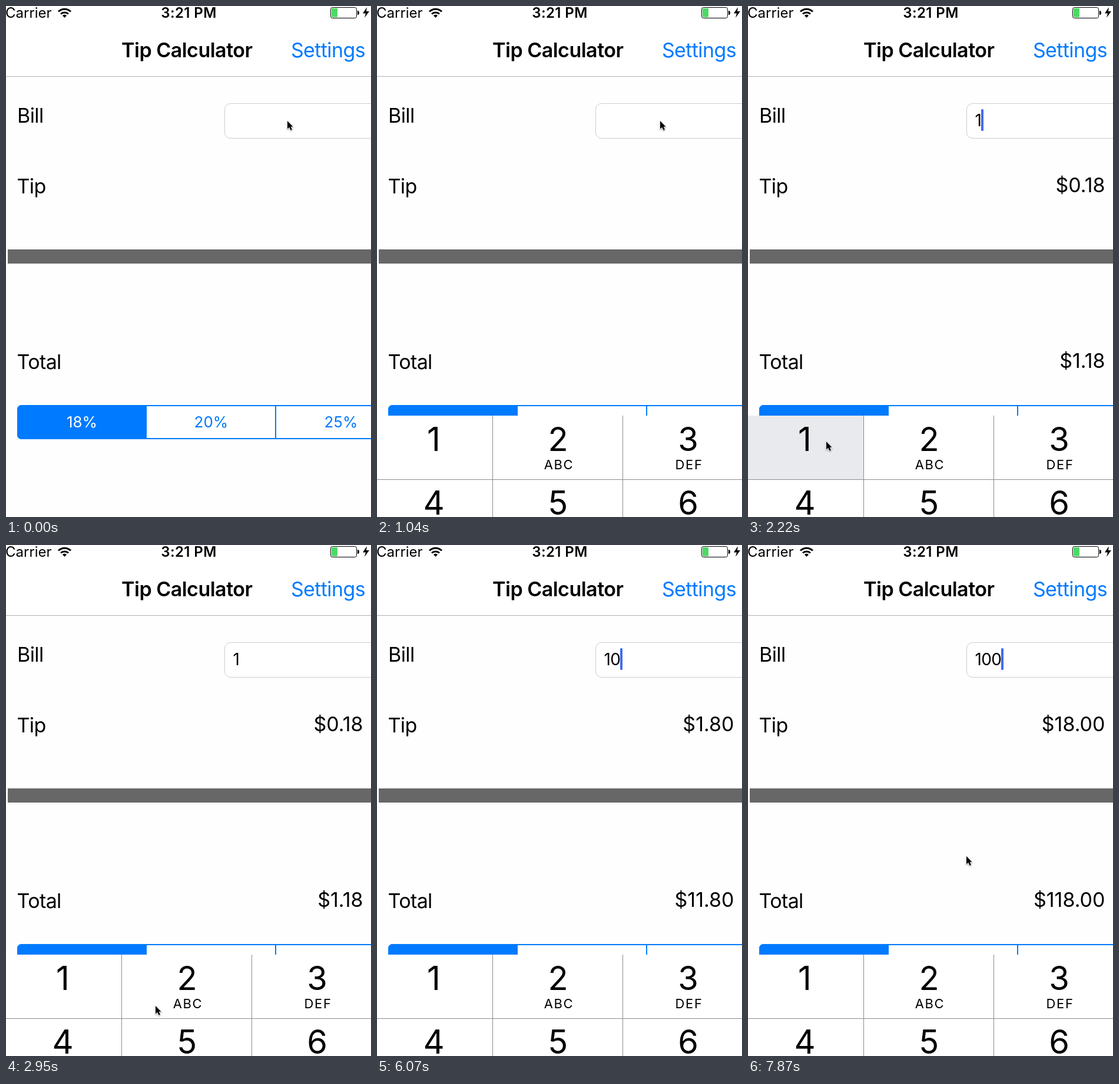
These frames come from a looping animation (620x867 px, 8000 ms). An HTML page:

```html
<!DOCTYPE html>
<html lang="en">
<head>
<meta charset="utf-8">
<title>Tip Calculator</title>
<style>
html, body { margin: 0; width: 100%; height: 100%; overflow: hidden; background: #fefefe; }
svg { display: block; width: 620px; height: 867px; font: 34px Inter, "Liberation Sans", sans-serif; letter-spacing: -.018em; }
.mid { text-anchor: middle; }
.end { text-anchor: end; }
.bold { font-weight: 600; }
.blue { fill: #007aff; }
.money { text-anchor: end; letter-spacing: 0; }
.small { font-size: 24px; letter-spacing: 0; }
.seg { font-size: 26px; letter-spacing: 0; }
.digit { font-size: 56px; letter-spacing: 0; }
.abc { font-size: 22px; letter-spacing: 1.7px; }
</style>
</head>
<body>
<svg viewBox="0 0 620 867">
  <rect width="620" height="119" fill="#fff"/>
  <text class="small" x="-1" y="20">Carrier</text>
  <g fill="none" stroke="#000" stroke-width="3">
    <path d="M89 9.5a15 15 0 0 1 21 0M93 13.5a9.5 9.5 0 0 1 13 0"/>
    <path d="M96 16.2a5.4 5.4 0 0 1 7 0L99.5 20Z" fill="#000" stroke="none"/>
  </g>
  <text class="small bold mid" x="310.5" y="20" style="letter-spacing:.4px">3:21 PM</text>
  <rect x="551.5" y="2.5" width="44" height="18" rx="3" fill="#fff" stroke="#000"/>
  <rect x="553" y="4" width="10" height="15" rx="1" fill="#4cd964"/>
  <path d="M597 8q3 0 3 3.5t-3 3.5Z"/>
  <path d="M613 2L606 12.5H611L609 20L617 9H612Z"/>
  <text class="bold mid" x="307.3" y="87" style="letter-spacing:-.015em">Tip Calculator</text>
  <text class="blue end" x="610" y="87">Settings</text>
  <path d="M0 119.5H620" stroke="#b2b2b2"/>

  <text x="19" y="198">Bill</text>
  <text x="18.500" y="318">Tip</text>
  <text x="18.500" y="616">Total</text>
  <rect x="371.5" y="165.5" width="280" height="59" rx="10" fill="#fff" stroke="#ccc"/>
  <text id="bill" x="385.5" y="204" style="font-size:28px"></text>
  <rect id="caret" y="175" width="4" height="37" rx="1.5" fill="#426bf2"/>
  <text id="tip" class="money" x="606.5" y="316"></text>
  <text id="total" class="money" x="606.5" y="614"></text>
  <rect x="3" y="413" width="617" height="24" fill="#676767"/>

  <rect x="20" y="678" width="658" height="56" rx="7" fill="#fff" stroke="#007aff" stroke-width="2"/>
  <path class="blue" d="M239 677H27q-8 0-8 8V727q0 8 8 8H239Z"/>
  <path d="M458 678V734" stroke="#007aff" stroke-width="2"/>
  <text class="seg mid" x="129" y="715" fill="#fff">18%</text>
  <text class="seg mid blue" x="348.5" y="715">20%</text>
  <text class="seg mid blue" x="569" y="715">25%</text>

  <g id="pad">
    <rect width="620" height="440" fill="#fff"/>
    <rect id="press" width="196" height="108" fill="#d2d5db"/>
    <path d="M196.5 0V440M417.5 0V440M0 108.5H620" fill="none" stroke="#8c8c8c"/>
  </g>
  <path id="mouse" d="M0 0V13.5L3.2 10.7L5.6 15.8L8 14.7L5.7 9.8H9.5Z" stroke="#fff" stroke-width="1.5" paint-order="stroke"
    style="filter:drop-shadow(0 1px 1px #0006)"/>
</svg>
<script>
const $ = id => document.getElementById(id);
const clamp = v => Math.min(1, Math.max(0, v));
const money = v => '$' + v.toFixed(2);
const TICK = 148;

['', 'ABC', 'DEF', '', '', ''].forEach((letters, i) => {
  const x = 96.5 + i % 3 * 216 - (i % 3 ? 5 : 0) + (i % 3 == 2 ? 5 : 0), y = i < 3 ? 60 : 168;
  $('pad').insertAdjacentHTML('beforeend',
    `<text class="digit mid" x="${x}" y="${y}">${i + 1}</text>
     <text class="abc mid" x="${x + 1.5}" y="91">${letters}</text>`);
});

// The caret stays lit after each restart, then blinks softly.
const typed = [2200, 6050, 6650];
const restarts = [290, 1920, ...typed];
function caret(t) {
  const start = restarts.findLast(s => s <= t);
  if (!start) return 0;
  const age = t - start;
  return age < 500 ? 1 : clamp(.85 + 1.2 * Math.cos((age - 318) / 985 * 2 * Math.PI));
}

// Pointer moves: start ms, end ms, destination; off stage between the last two.
const moves = [
  [0, 300, 481, 195], [1340, 1925, 133, 739], [2360, 2950, 254, 782],
  [5030, 5170, 254, 900], [6000, 6100, 338, 900], [7270, 7840, 371, 528]
];
function pointer(t) {
  let x = 478, y = 195;
  for (const [from, to, endX, endY] of moves) {
    const e = Math.sin(clamp((t - from) / (to - from)) * Math.PI / 2);
    x += (endX - x) * e;
    y += (endY - y) * e;
  }
  return `translate(${x} ${y})`;
}

function draw(now) {
  // The screen refreshes in even ticks.
  const t = Math.floor((now % 8000 + 20) / TICK) * TICK;
  const count = typed.filter(s => s <= t).length, text = '100'.slice(0, count);
  $('bill').textContent = text;
  $('tip').textContent = text && money(text * .18);
  $('total').textContent = text && money(text * 1.18);
  $('caret').setAttribute('x', count ? 379 + 17 * count : 385);
  $('caret').setAttribute('opacity', caret(t));
  $('press').setAttribute('opacity', t < 2050 ? 0 : clamp((2360 - t) / 280));
  $('pad').setAttribute('transform', `translate(0 ${695 + 432 * (1 - clamp(t / 345)) ** 3})`);
  $('mouse').setAttribute('transform', pointer(t));
  requestAnimationFrame(draw);
}
draw(performance.now());
</script>
</body>
</html>
```
